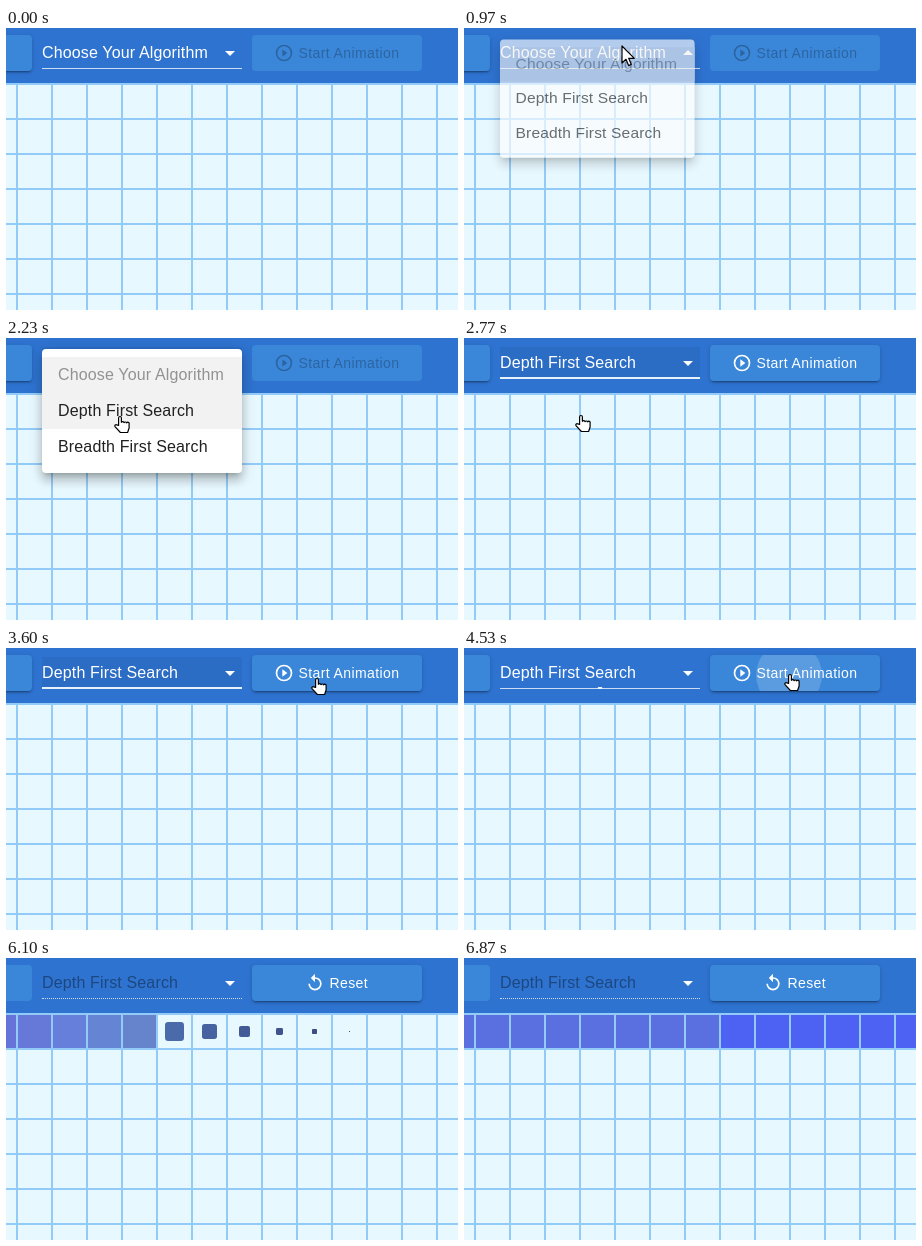
An HTML page that plays this animation: 452 by 282 pixels, repeating every 7.51 s.

```html
<!DOCTYPE html>
<html lang="en">
<head>
<meta charset="utf-8">
<title>Algorithm picker</title>
<style>
html, body { margin: 0; width: 100%; height: 100%; overflow: hidden; }
body { font: 16px/36px "Liberation Sans", Arial, sans-serif; letter-spacing: .15px; white-space: nowrap; }
#stage { position: relative; width: 452px; height: 282px; overflow: hidden; background: #e7f8fe; }
#stage div, #stage svg { position: absolute; }
#grid { inset: 0;
  background:
    repeating-linear-gradient(90deg, #93cbf8 0 2px, transparent 2px 35px) 10px 0,
    repeating-linear-gradient(#93cbf8 0 2px, transparent 2px 35px) 0 55px;
  background-size: 455px 100%, 100% 350px; }
#bar { left: 0; top: 0; width: 452px; height: 55px; background: #2e73d0; }
.button { top: 7px; height: 36px; border-radius: 4px; background: #3a87d9; overflow: hidden;
  font-size: 14px; letter-spacing: .4px; }
.raised { box-shadow: 0 3px 1px -2px rgba(0,0,0,.2), 0 2px 2px rgba(0,0,0,.14), 0 1px 5px rgba(0,0,0,.12); }
#side { left: -60px; width: 86px; }
#action { left: 246px; width: 170px; }
#ripple { left: 79px; top: 20px; width: 190px; height: 190px; margin: -95px; border-radius: 50%; background: #fff; }
#focus { left: 36px; top: 9px; width: 200px; height: 31px; background: rgba(0,0,0,.06); }
#choice { left: 36px; top: 7px; }
#rule { left: 36px; top: 40px; width: 200px; border-top: 1px solid rgba(255,255,255,.75); }
#underline { left: 36px; top: 39px; width: 200px; height: 2px; background: #e9f1fb; }
#menu { left: 36px; top: 11px; width: 200px; height: 124px; border-radius: 4px; background: #fff;
  transform-origin: 0 13px; color: #212121;
  box-shadow: 0 5px 5px -3px rgba(0,0,0,.2), 0 8px 10px 1px rgba(0,0,0,.14), 0 3px 14px 2px rgba(0,0,0,.12); }
#menu div { left: 0; width: 184px; height: 36px; padding-left: 16px; }
#cursor { left: 0; top: 0; overflow: visible; fill: #fff; stroke: #000; stroke-width: 1.2; stroke-linejoin: round; }
</style>
</head>
<body>
<div id="stage">
  <div id="grid"></div>
  <div id="cells"></div>
  <div id="bar"></div>
  <div id="side" class="button"></div>
  <div id="action" class="button">
    <div id="start">
      <svg width="20" height="20" viewBox="0 0 24 24" style="left:22px;top:8px">
        <circle cx="12" cy="12" r="9" fill="none" stroke="currentColor" stroke-width="2"/>
        <path d="M10 16.5l6-4.5-6-4.5z" fill="currentColor"/>
      </svg>
      <div style="left:46.5px">Start Animation</div>
    </div>
    <div id="reset" style="color:#fff">
      <svg width="20" height="20" viewBox="0 0 24 24" style="left:53px;top:8px">
        <path d="M12 5V1L7 6l5 5V7a6 6 0 1 1-6 6H4a8 8 0 1 0 8-8z" fill="currentColor"/>
      </svg>
      <div style="left:77.5px">Reset</div>
    </div>
    <div id="ripple"></div>
  </div>
  <div id="focus"></div>
  <div id="choice"></div>
  <svg id="arrow" width="24" height="24" style="left:212px;top:13px"><path d="M7 10l5 5 5-5z" fill="#fff"/></svg>
  <div id="rule"></div>
  <div id="underline"></div>
  <div id="menu">
    <div style="top:8px;background:#f2f2f2;color:#929292">Choose Your Algorithm</div>
    <div id="depth" style="top:44px">Depth First Search</div>
    <div id="breadth" style="top:80px">Breadth First Search</div>
  </div>
  <svg id="cursor" width="20" height="24">
    <path id="pointer" d="M0 0V17L4 13.3 6.6 19.6 9.3 18.4 6.7 12.3H12.3Z"/>
    <path id="hand" d="M4.6 9.5V1.9a1.4 1.4 0 0 1 2.8 0V6.3a1.4 1.2 0 0 1 2.6.3 1.4 1.2 0 0 1 2.6.4 1.3 1.2 0 0 1 2.5 1V12L13.6 16.5H6.4L1 10.6a1.3 1.3 0 0 1 1.9-1.7Z"/>
  </svg>
</div>
<script>
const LOOP = 7510, OPEN = 875, CLOSE = 2440, PRESS = 4370, RUN = 5070, FADE = 232;
const el = id => document.getElementById(id);
const clamp = x => Math.max(0, Math.min(1, x));
const show = (id, on) => el(id).style.visibility = on ? 'visible' : 'hidden';

// CSS-style cubic Bezier easing, solved by bisection
const bezier = (x1, y1, x2, y2) => x => {
  x = clamp(x);
  const at = (a, b, u) => 3 * a * u * (1 - u) ** 2 + 3 * b * u * u * (1 - u) + u ** 3;
  let lo = 0, hi = 1;
  for (let i = 0; i < 20; i++) {
    const mid = (lo + hi) / 2;
    if (at(x1, x2, mid) < x) lo = mid; else hi = mid;
  }
  return at(y1, y2, lo);
};
const standard = bezier(.4, 0, .2, 1), easeOut = bezier(0, 0, .2, 1), smooth = bezier(.3, 0, .7, 1);

// Interpolates rows of [key, ...values]
function track(rows, key, ease = x => x) {
  let i = 1;
  while (i < rows.length - 1 && rows[i][0] < key) i++;
  const a = rows[i - 1], b = rows[i], k = ease(clamp((key - a[0]) / (b[0] - a[0])));
  return a.slice(1).map((v, j) => v + (b[j + 1] - v) * k);
}

const path = [
  [530, 379, 46], [860, 158, 18], [980, 158, 18], [1230, 138, 60], [1300, 138, 60],
  [1630, 112, 104], [1970, 112, 104], [2200, 108, 78], [2340, 108, 78], [2430, 111, 77],
  [2870, 111, 77], [2930, 184, 62], [3070, 184, 62], [3730, 320, 26], [5630, 320, 26], [5760, 328, 2]
];
const shades = [
  [0, 56, 66, 122], [5.3, 74, 105, 168], [6.3, 102, 132, 204], [7.3, 102, 132, 212],
  [8.3, 102, 127, 218], [10.3, 102, 116, 217], [13, 90, 112, 224], [15.5, 77, 97, 242]
];
const cells = [];
for (let col = -1; col < 13; col++) cells.push({ col, box: el('cells').appendChild(document.createElement('div')) });

function drawCells(t) {
  for (const { col, box } of cells) {
    const age = (t - 6100) / 40 + 9.3 - col;
    const size = age < 0 ? 0 : age < 5.4 ? 3.4 * age : Math.min(33, 18.4 + (age - 5.4) * 17);
    // The left columns settle on a paler shade
    const tone = col > 6 ? age : t >= 6370 ? 13 : Math.min(age, 13);
    box.style.cssText = `left:${28.5 + 35 * col - size / 2}px;top:${73.5 - size / 2}px;width:${size}px;height:${size}px;` +
      `border-radius:${size < 33 ? size * .18 : 0}px;background:rgb(${track(shades, tone)})`;
  }
}

function drawMenu(t, y) {
  const closing = t >= CLOSE, since = t - (closing ? CLOSE : OPEN);
  const fade = standard(since / FADE);
  const grow = standard((closing ? since - FADE / 3 : since) / (FADE * .666));
  const alpha = closing ? 1 - fade : fade, scale = closing ? 1 - grow : grow;
  const style = el('menu').style;
  style.opacity = alpha;
  style.transform = scale < 1 ? `scale(${.75 + .25 * scale},${.5625 + .4375 * scale})` : 'none';
  show('menu', t >= OPEN && alpha > 0);
  el('depth').style.background = y >= 55 && y < 91 ? '#f2f2f2' : '';
  el('breadth').style.background = y >= 91 ? '#f2f2f2' : '';
}

function drawBar(t) {
  const running = t >= RUN, enabled = clamp((t - CLOSE) / 250);
  el('side').classList.toggle('raised', !running);
  el('action').classList.toggle('raised', t >= CLOSE + 60);
  el('start').style.color = `rgba(${track([[0, 0, 0, 0, .26], [1, 255, 255, 255, 1]], enabled)})`;
  show('start', !running);
  show('reset', running);

  el('choice').textContent = t < CLOSE ? 'Choose Your Algorithm' : 'Depth First Search';
  el('choice').style.color = running ? 'rgba(0,0,0,.38)' : '#fff';
  el('rule').style.borderTopStyle = running ? 'dotted' : 'solid';
  el('arrow').style.transform = t >= OPEN && t < CLOSE ? 'rotate(180deg)' : '';
  show('focus', t >= 1100 && t < PRESS);
  show('underline', t >= 1100 && t < PRESS + 200);
  el('underline').style.transform = `scaleX(${1 - easeOut((t - PRESS) / 200)})`;

  const ripple = el('ripple').style;
  const spread = standard((t - PRESS) / 550);
  ripple.transform = `scale(${spread})`;
  ripple.opacity = (.1 + .2 * spread) * (1 - standard((t - 4530) / 400));
  show('ripple', t >= PRESS && t < 4930);
}

function frame() {
  const t = performance.now() % LOOP;
  const [x, y] = track(path, t, smooth);
  const visible = t >= 530 && t < 5760;
  const hand = t >= 1180 && t < 2880 || t >= 3500;
  drawCells(t);
  drawBar(t);
  drawMenu(t, y);
  el('cursor').style.transform = `translate(${Math.round(x)}px,${Math.round(y)}px)`;
  show('hand', visible && hand);
  show('pointer', visible && !hand);
  requestAnimationFrame(frame);
}
frame();
</script>
</body>
</html>
```
